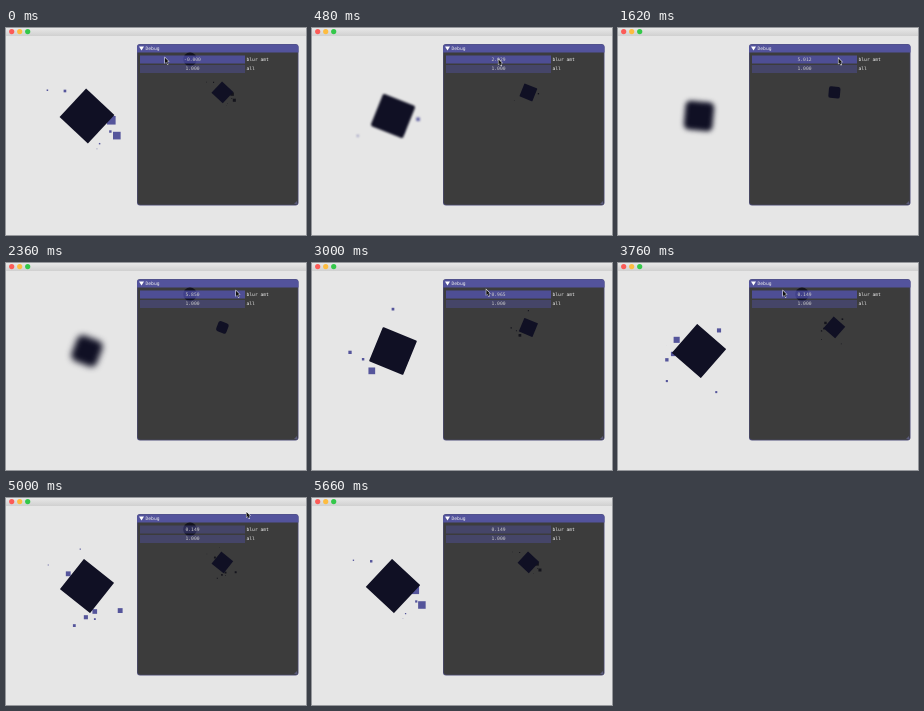
Recreate the animation shown at these times as an HTML page with a canvas. Size 300 px wide and 207 px high, loop 5680 ms.

```html
<!DOCTYPE html>
<html>
<head>
<meta charset="utf-8">
<style>
html, body { margin: 0; width: 300px; height: 207px; overflow: hidden; background: #e6e6e6; }
canvas { display: block; }
</style>
</head>
<body>
<canvas id="stage" width="300" height="207"></canvas>
<script>
const ctx = document.getElementById('stage').getContext('2d');
const LOOP = 5680, QUARTER_TURN = 629, PARTICLES = 44;
const CENTER = { x: 81, y: 88 };
const INK = '#101024', BLUE = '#55559b', SHADE = '#14141c';

// Pointer key points: time, x, y
const drag = [
  [0, 159, 29], [940, 212, 32], [2360, 230, 27],
  [3000, 174.3, 26], [3760, 165, 27], [4750, 165, 27], [5220, 302, 2]
];
const RELEASE = 4000;

function pointerAt(t) {
  const i = drag.findIndex(k => k[0] > t);
  if (i < 0) return null;
  const [t0, x0, y0] = drag[i - 1], [t1, x1, y1] = drag[i];
  const u = (t - t0) / (t1 - t0), k = u * u * (3 - 2 * u);
  return { x: x0 + (x1 - x0) * k, y: y0 + (y1 - y0) * k };
}

// The slider follows the pointer until it is released
const blurAt = t => Math.max(0, (pointerAt(Math.min(t, RELEASE)).x - 163.3) * .0877);

function random(seed) {
  const v = Math.sin(seed * 127.1 + 11.7) * 43758.5453;
  return v - Math.floor(v);
}

function box(x, y, w, h, color, r = 0) {
  ctx.fillStyle = color;
  ctx.beginPath();
  ctx.roundRect(x, y, w, h, r);
  ctx.fill();
}

function disc(x, y, r, color) {
  ctx.fillStyle = color;
  ctx.beginPath();
  ctx.arc(x, y, r, 0, 7);
  ctx.fill();
}

function poly(points, color) {
  ctx.fillStyle = color;
  ctx.beginPath();
  points.forEach(p => ctx.lineTo(...p));
  ctx.fill();
}

function label(text, x, y, align = 'left', color = '#eee') {
  ctx.font = '4.65px "DejaVu Sans Mono", monospace';
  ctx.textAlign = align;
  ctx.textBaseline = 'middle';
  ctx.fillStyle = color;
  ctx.fillText(text, x, y);
}

function square(x, y, side, color, angle = 0, r = 0) {
  if (side <= 0) return;
  ctx.save();
  ctx.translate(x, y);
  ctx.rotate(angle);
  box(-side / 2, -side / 2, side, side, color, r);
  ctx.restore();
}

// Particles shoot out from behind the square, then shrink; blur eats the edges of every shape
function scene(t, blur, color) {
  const eaten = 2 * blur;
  for (let i = 0; i < PARTICLES; i++) {
    const age = (t - i * LOOP / PARTICLES + LOOP) % LOOP;
    const life = 700 + 700 * random(i);
    if (age > life) continue;
    const size = (4 + 9 * random(i + 100)) * (1 - age / life);
    const reach = (28 + 20 * random(i + 200)) * (1 - Math.exp(-age / 150));
    const way = 2 * Math.PI * random(i + 300);
    square(CENTER.x + reach * Math.cos(way), CENTER.y + reach * Math.sin(way), size - eaten, color);
  }
  const angle = (43 + 90 * t / QUARTER_TURN) * Math.PI / 180;
  square(CENTER.x, CENTER.y, 38.8 - eaten, INK, angle, blur);
}

function preview(t, blur) {
  ctx.save();
  ctx.translate(184, 29.2);
  ctx.scale(.4, .4);
  if (t % 1180 < 400) disc(0, 5, 17, SHADE);
  scene(t, blur, SHADE);
  ctx.restore();
}

function slider(y, name, value, active) {
  box(134, y, 105, 8, active ? 'rgba(88, 88, 190, .68)' : 'rgba(84, 84, 170, .4)');
  label(value, 186.5, y + 4.2, 'center', '#ccc');
  label(name, 240.5, y + 4.2);
}

function panel(t, blur) {
  box(131, 16, 161.5, 161.5, '#50507c', 3);
  box(131.6, 17, 160.2, 159.8, '#3c3c3c', 3);
  box(131, 16.5, 161.5, 8, '#53539c', [3, 3, 0, 0]);
  poly([[133, 18.5], [138, 18.5], [135.5, 22.5]], '#fff');
  label('Debug', 139.5, 20.8);
  preview(t, blur);
  slider(27.5, 'blur amt', (t < 60 ? '-' : '') + blur.toFixed(3), t < RELEASE);
  slider(37, 'all', '1.000', false);
  poly([[291, 173], [291, 176], [288, 176]], '#5a5a78');
}

function titleBar() {
  const shade = ctx.createLinearGradient(0, 0, 0, 8);
  shade.addColorStop(0, '#e8e8e8');
  shade.addColorStop(1, '#d0d0d0');
  box(0, 0, 300, 8, shade);
  ['#fc5b57', '#fdbc40', '#34c84a'].forEach((c, i) => disc(5.7 + 8 * i, 3.6, 2.6, c));
}

function pointer({ x, y }) {
  const shape = [[0, 0], [0, 7], [1.7, 5.6], [2.8, 8], [4, 7.5], [3, 5], [5, 5]];
  poly(shape.map(([a, b]) => [x + a - .5, y + b * 1.05 - .6]), '#fff');
  poly(shape.map(([a, b]) => [x + a * .75, y + .7 + b * .78]), '#111');
}

function draw(t) {
  const blur = blurAt(t), hand = pointerAt(t);
  box(0, 0, 300, 207, '#e6e6e6');
  ctx.filter = blur > .3 ? `blur(${.35 + .45 * blur}px)` : 'none';
  scene(t, blur, BLUE);
  ctx.filter = 'none';
  titleBar();
  panel(t, blur);
  if (hand) pointer(hand);
}

const start = performance.now();
function tick() {
  draw((performance.now() - start) % LOOP);
  requestAnimationFrame(tick);
}
tick();
</script>
</body>
</html>
```
